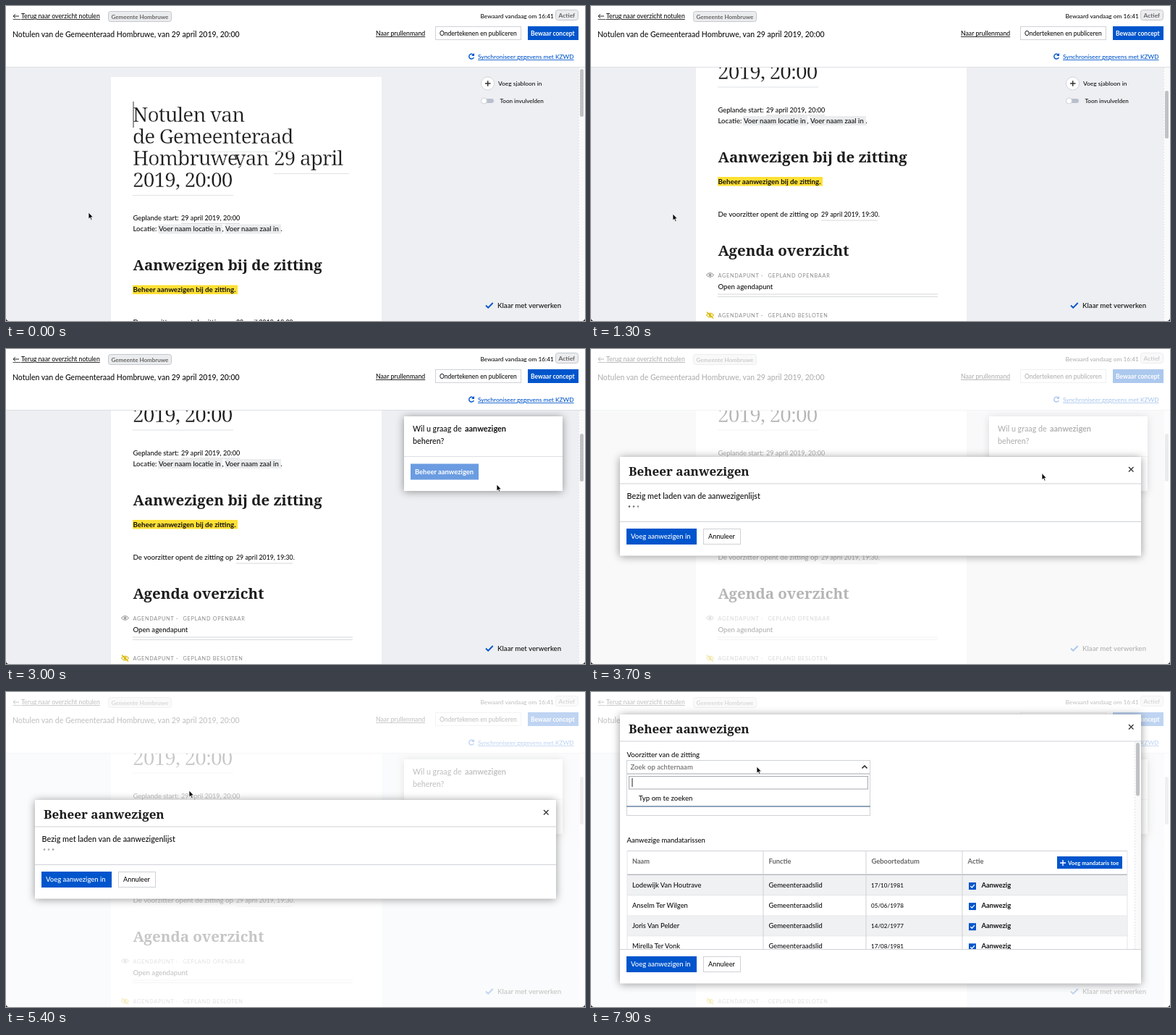
These frames come from a looping animation (800x435 px, 8 s). An HTML page:

```html
<!DOCTYPE html>
<html lang="nl">
<head>
<meta charset="utf-8">
<title>Aanwezigen beheren</title>
<style>
  html, body { margin: 0; width: 100%; height: 100%; overflow: hidden; background: #fff; }
  svg { display: block; width: 800px; height: 435px; }
  text { font-family: Lato, "Open Sans", sans-serif; font-weight: 500; fill: #111; white-space: pre; }
  .b { font-weight: 700; }
  .u { text-decoration: underline; }
  .w { fill: #fff; }
  .g { fill: #666; }
  .blue { fill: #0055cc; }
  .title, .head { font-family: "Noto Serif", serif; fill: #1c1c1c; }
  .title { font-size: 28px; font-weight: 400; letter-spacing: -.9px; stroke: #fff; stroke-width: .4px; }
  .head { font-weight: 700; }
  .caps { font-weight: 400; letter-spacing: .7px; fill: #8c8c8c; }
  .shadow { filter: drop-shadow(0 1px 6px rgba(0, 0, 0, .4)); }
</style>
</head>
<body>
<svg id="stage" viewBox="0 0 800 435"></svg>
<script>
const LOOP = 8000, STEP = 100;
const BLUE = '#0055cc', LINE = '#cfd2d6';

// Markup helpers
const text = (x, y, size, str, cls = '') => `<text x="${x}" y="${y}" font-size="${size}" class="${cls}">${str}</text>`;
const rect = (x, y, w, h, fill, more = '') => `<rect x="${x}" y="${y}" width="${w}" height="${h}" fill="${fill}" ${more}/>`;
const box = (x, y, w, h, stroke = LINE, fill = '#fff', rx = 0) =>
  rect(x + .5, y + .5, w - 1, h - 1, fill, `stroke="${stroke}" rx="${rx}"`);
const path = (d, stroke, width = 1, more = '') =>
  `<path d="${d}" fill="none" stroke="${stroke}" stroke-width="${width}" ${more}/>`;
const group = (id, body, more = '') => `<g id="${id}" ${more}>${body}</g>`;

const eye = (y, color) =>
  path(`M159.500 ${y}Q164.500 ${y - 6} 169.500 ${y}Q164.500 ${y + 6} 159.500 ${y}Z`, color, 1.1) +
  `<circle cx="164.500" cy="${y}" r="1.900" fill="${color}"/>`;

const agendaItem = (y, status, color) =>
  eye(y - 3, color) + text(175.5, y, 7.3, 'AGENDAPUNT -', 'caps') + text(244.5, y, 7.3, status, 'caps') +
  text(175.5, y + 16, 9.6, 'Open agendapunt') +
  rect(175, y + 23, 304, 1, '#d5d8dc') + rect(175, y + 26.5, 304, 1, '#d5d8dc');

const page = () => rect(145, 98, 374, 900, '#fff') +
  text(175, 160, 28, 'Notulen van', 'title') +
  text(175, 190, 28, 'de Gemeenteraad', 'title') +
  text(175, 220, 28, 'Hombruwe,', 'title') +
  text(315.5, 220, 28, 'van', 'title') +
  text(370, 220, 28, '29 april', 'title') +
  text(175, 250, 28, '2019, 20:00', 'title') +
  rect(282, 201, 117, 1, '#e6e8eb') + rect(370, 231, 104, 1, '#dfe2e6') + rect(175, 261, 139, 1, '#dfe2e6') +
  rect(175.5, 132, 1, 36, '#333') +
  text(175.5, 296, 9.4, 'Geplande start:') + text(242, 296, 9.1, '29 april 2019, 20:00') +
  rect(242, 300, 81, 1, '#d5d8dc') +
  rect(210, 301.5, 89, 13, '#eaecee') + rect(302.5, 301.5, 77.5, 13, '#eaecee') +
  text(175.5, 311, 9.6, 'Locatie:') +
  text(211, 311, 9.6, 'Voer naam locatie in') + text(298.5, 311, 9.6, ',') +
  text(303, 311, 9.6, 'Voer naam zaal in') + text(379.5, 311, 9.6, '.') +
  text(175.5, 365, 20.5, 'Aanwezigen bij de zitting', 'head') +
  rect(175, 385.5, 145, 12.5, '#ffe034', 'id="mark"') +
  text(175.5, 395, 9.75, 'Beheer aanwezigen bij de zitting.', 'b') +
  rect(208.5, 385, 1, 13, '#222', 'id="caret"') +
  text(175.5, 440, 9.7, 'De voorzitter opent de zitting op') +
  text(318, 440, 8.8, '29 april 2019, 19:30.') + rect(318, 445, 78, 1, '#d5d8dc') +
  text(175.5, 494, 20.5, 'Agenda overzicht', 'head') +
  agendaItem(524, 'GEPLAND OPENBAAR', '#a0a0a0') +
  agendaItem(579.5, 'GEPLAND BESLOTEN', '#d8b800') +
  path('M160 572l9 9', '#d8b800', 1.2);

const header = () => rect(0, 0, 800, 84, '#fff') + rect(0, 84, 800, 1, '#dcdfe3') +
  path('M18 14H10m3-2.700L10 14l3 2.700', '#222') +
  text(21, 17, 8.7, 'Terug naar overzicht notulen', 'u') + rect(9.5, 18, 11, .8, '#222') +
  box(141, 7, 88, 15, '#c3c7cc', '#ebecee', 3) + text(145.5, 17.5, 8, 'Gemeente Hombruwe', 'b g') +
  text(9, 43, 10.5, 'Notulen van de Gemeenteraad Hombruwe, van 29 april 2019, 20:00') +
  text(655.5, 16.5, 8.3, 'Bewaard vandaag om 16:41') +
  box(759, 5, 32, 15, '#c3c7cc', '#ebecee', 3) + text(763.5, 16, 8.4, 'Actief', 'b g') +
  text(511, 41, 8.7, 'Naar prullenmand', 'u') +
  box(593, 28, 119, 19) + text(599, 41, 8.5, 'Ondertekenen en publiceren') +
  rect(721, 28, 70, 19, BLUE) + text(725, 41, 8.5, 'Bewaar concept', 'b w') +
  path('M645.800 67.500A3.400 3.400 0 1 0 646.300 71', BLUE, 1.4) +
  `<path d="M647 65v4h-4z" fill="${BLUE}"/>` +
  text(652, 73, 8.4, 'Synchroniseer gegevens met KZWD', 'u blue');

const tools = () =>
  `<circle cx="665.500" cy="107" r="9" fill="#fff" stroke="#d3d6da"/>` +
  path('M662 107h7.500M665.700 103.300v7.500', '#333', 1.5) + text(680, 110, 8.4, 'Voeg sjabloon in') +
  rect(657, 128, 17, 6, '#b9bfcd', 'rx="3"') +
  `<circle cx="660.500" cy="131" r="4" fill="#fff" stroke="#ccd0d6"/>` + text(682.5, 134, 8.1, 'Toon invulvelden') +
  path('M663 413.500l3.200 3.200 6.500-6.700', BLUE, 1.9) + text(679, 416.5, 9.7, 'Klaar met verwerken') +
  rect(791, 85, 9, 350, '#fafafa') + path('M791.500 85V435', '#e2e4e7', 1, 'stroke-dasharray="2 2"') +
  rect(793, 87, 5, 66, '#bfc1c4', 'id="thumb" rx="2.500"');

const hint = () => rect(520, 222, 68, 46.5, '#fff') + rect(585, 222, 3, 46.5, '#b9c1ca') +
  ['Klik om de', 'juiste optie', 'selecteren'].map((s, i) => text(528.5, 235.5 + i * 13.6, 9, s)).join('');

const popover = () => rect(550, 93, 219, 103, '#fff', 'class="shadow"') +
  text(562, 113.5, 10.7, 'Wil u graag de') + text(634, 113.5, 10.9, 'aanwezigen', 'b') +
  text(562, 131, 10.7, 'beheren?') + rect(550, 148, 219, 1, '#dcdfe3') +
  rect(559, 158.5, 94, 22, BLUE, 'id="action"') + text(565, 173, 9.4, 'Beheer aanwezigen', 'b w');

const modalHead = () => text(52, 26, 17, 'Beheer aanwezigen', 'head') +
  rect(40, 36.500, 720, 1, LINE) + path('M743 14l6.500 6.500m0-6.500l-6.500 6.500', '#333', 1.3);

const modalFoot = () => rect(40, 0, 720, 1, LINE) +
  rect(49, 10, 97, 22, BLUE) + text(55, 24, 9.5, 'Voeg aanwezigen in', 'w') +
  box(155, 10, 52, 22) + text(162, 24, 9.2, 'Annuleer');

const loading = () => text(49.5, 206.5, 10.8, 'Bezig met laden van de aanwezigenlijst') +
  [53, 59, 65].map(x => `<circle class="dot" cx="${x}" cy="217.500" r="1.300" fill="#555"/>`).join('');

const members = [
  ['Lodewijk Van Houtrave', '17/10/1981'],
  ['Anselm Ter Wilgen', '05/06/1978'],
  ['Joris Van Pelder', '14/02/1977'],
  ['Mirella Ter Vonk', '17/08/1981'],
];

const memberRow = ([name, born], i) => {
  const y = 253 + i * 28.1;
  return rect(50, y, 691, 28, i % 2 ? '#fff' : '#f0f1f3') + rect(50, y + 27.5, 691, 1, '#d9dce0') +
    text(57, y + 17, 9.4, name) + text(245.5, y + 17, 9.3, 'Gemeenteraadslid') +
    text(387, y + 17, 8.1, born, 'born') +
    rect(522, y + 10, 10, 10, BLUE) + path(`M524.300 ${y + 15}l2 2 3.600-4`, '#fff', 1.3) +
    text(539.5, y + 17, 9.4, 'Aanwezig', 'b');
};

const form = () => text(49.5, 90, 9.6, 'Voorzitter van de zitting') +
  box(49, 94, 337, 19) + text(54.5, 107, 9.6, 'Zoek op achternaam', 'g') +
  path('M374.500 102l3.500 3.500 3.500-3.500', '#333', 1.5, 'id="chevron"') +
  text(49.5, 143.5, 9.6, 'Secretaris van de zitting') + text(154, 143.5, 9.6, '- vrij invulveld', 'g') +
  box(49, 149, 337, 22) +
  text(49.5, 207.5, 9.5, 'Aanwezige mandatarissen') +
  rect(50, 219, 691, 1, LINE) +
  text(57, 236.5, 9.2, 'Naam', 'b g') + text(245.5, 236.5, 9.4, 'Functie', 'b g') +
  text(387.5, 236.5, 9.4, 'Geboortedatum', 'b g') + text(520.5, 236.5, 9.4, 'Actie', 'b g') +
  rect(644, 227, 90, 17, BLUE) + path('M648 236h8m-4-4v8', '#fff', 1.4) +
  text(659, 239, 7.7, 'Voeg mandataris toe', 'b w') +
  members.map(memberRow).join('') + rect(50, 251.5, 691, 1.5, '#b5b9be') +
  [50, 238, 380, 513, 741].map((x, i) => rect(x - .5, 219, 1, 140, i % 4 ? LINE : '#e3e5e8')).join('') +
  rect(751, 69, 9, 290, '#fafafa') + path('M751.500 69V356', '#e2e4e7', 1, 'stroke-dasharray="2 2"') +
  rect(753, 70, 5, 73.5, '#bfc1c4', 'rx="2.500"');

const dropdown = () => box(49, 113, 337, 46) + rect(49, 157, 337, 2, '#8fa3b8') +
  box(52, 116, 331, 18.5, '#a4a8ad') + rect(56.5, 119, 1, 12, '#222') +
  text(66, 150, 9.6, 'Typ om te zoeken');

const arrow = '<path d="M0 0V9.200L2.100 7.300 3.600 10.700 5.100 10 3.600 6.800H6.400Z" fill="#000" stroke="#fff" stroke-width=".8"/>';
const hand = '<path d="M-1 1Q0 -.6 1 1V5L5 6Q6 6.500 5.700 8.500L4.800 12H-.6L-3.600 7.700Q-3.300 6.300-1 8Z" fill="#fff" stroke="#222" stroke-width=".9"/>';

const stage = document.getElementById('stage');
stage.innerHTML =
  '<clipPath id="body"><rect x="40" y="68" width="720" height="287"/></clipPath>' +
  rect(0, 0, 800, 435, '#edeff2') + group('page', page()) + group('hint', hint()) +
  tools() + group('popover', popover()) + header() +
  group('modal', rect(0, 0, 800, 435, '#fff', 'id="veil"') +
    rect(40, 149, 720, 136, '#fff', 'id="panel" class="shadow"') +
    group('loading', loading()) + group('form', form(), 'clip-path="url(#body)"') +
    group('modalHead', modalHead()) + group('modalFoot', modalFoot()) + group('dropdown', dropdown())) +
  '<path d="M0 431.500Q.5 434.500 3.500 435H0ZM800 431.500Q799.500 434.500 796.500 435H800Z" fill="#222"/>' +
  group('arrow', arrow) + group('hand', hand);

const $ = id => document.getElementById(id);
const show = (el, on) => el.setAttribute('visibility', on ? 'visible' : 'hidden');
const move = (el, x, y) => el.setAttribute('transform', `translate(${x} ${y})`);
const within = (t, a, b) => t >= a && t < b;
const progress = (t, a, b) => Math.min(1, Math.max(0, (t - a) / (b - a)));
const ease = u => u * u * (3 - 2 * u);

// Pointer stops: time, x, y
const stops = [
  [0, 114, 285], [1000, 113, 287], [1400, 113, 287], [2100, 208.5, 243], [2500, 208.5, 243],
  [3000, 678, 187], [3400, 612, 168], [3600, 612, 168], [3800, 634, 175], [4200, 634, 175],
  [5400, 253, 136], [6400, 253, 136], [7100, 229, 103], [LOOP, 229, 103],
];

function pointer(t) {
  const i = stops.findIndex(s => s[0] > t);
  const [t0, x0, y0] = stops[i - 1], [t1, x1, y1] = stops[i];
  const u = ease(progress(t, t0, t1));
  return [x0 + (x1 - x0) * u, y0 + (y1 - y0) * u];
}

const dots = stage.querySelectorAll('.dot'), births = stage.querySelectorAll('.born');

function draw(t) {
  const scroll = 149.5 * ease(progress(t, 295, 1280));
  move($('page'), 0, -scroll);
  move($('thumb'), 0, scroll * .2);

  const hover = within(t, 2000, 2600);
  $('mark').setAttribute('fill', hover ? '#eaecee' : '#ffe034');
  show($('caret'), within(t, 2200, 2700));
  show($('hint'), within(t, 2200, 2800));
  show($('popover'), t >= 2800);
  $('action').setAttribute('opacity', .3 + .7 * progress(t, 2800, 3300));

  const open = t >= 3700, loaded = t >= 6400, picking = t >= 7400;
  const top = loaded ? 31 : 149, height = loaded ? 371.5 : 136.5;
  show($('modal'), open);
  $('veil').setAttribute('opacity', .6 + .15 * progress(t, 3600, 3800));
  $('panel').setAttribute('y', top);
  $('panel').setAttribute('height', height);
  move($('modalHead'), 0, top);
  move($('modalFoot'), 0, top + height - 47.5);
  show($('loading'), open && !loaded);
  show($('form'), loaded);
  show($('dropdown'), picking);
  $('chevron').setAttribute('transform', picking ? 'rotate(180 378 103.700)' : '');
  births.forEach(el => show(el, t >= 6900));
  dots.forEach((el, i) => el.setAttribute('opacity', .75 + .25 * Math.cos((t - 3800) / 160 - i * .7)));

  const [x, y] = pointer(t), pointing = hover || within(t, 3300, 3700);
  for (const id of ['arrow', 'hand']) {
    move($(id), x, y);
    show($(id), (id === 'hand') === pointing);
  }
}

const start = performance.now();
function tick() {
  const t = (performance.now() - start) % LOOP;
  draw(Math.floor(t / STEP) * STEP);
  requestAnimationFrame(tick);
}
tick();
</script>
</body>
</html>
```
